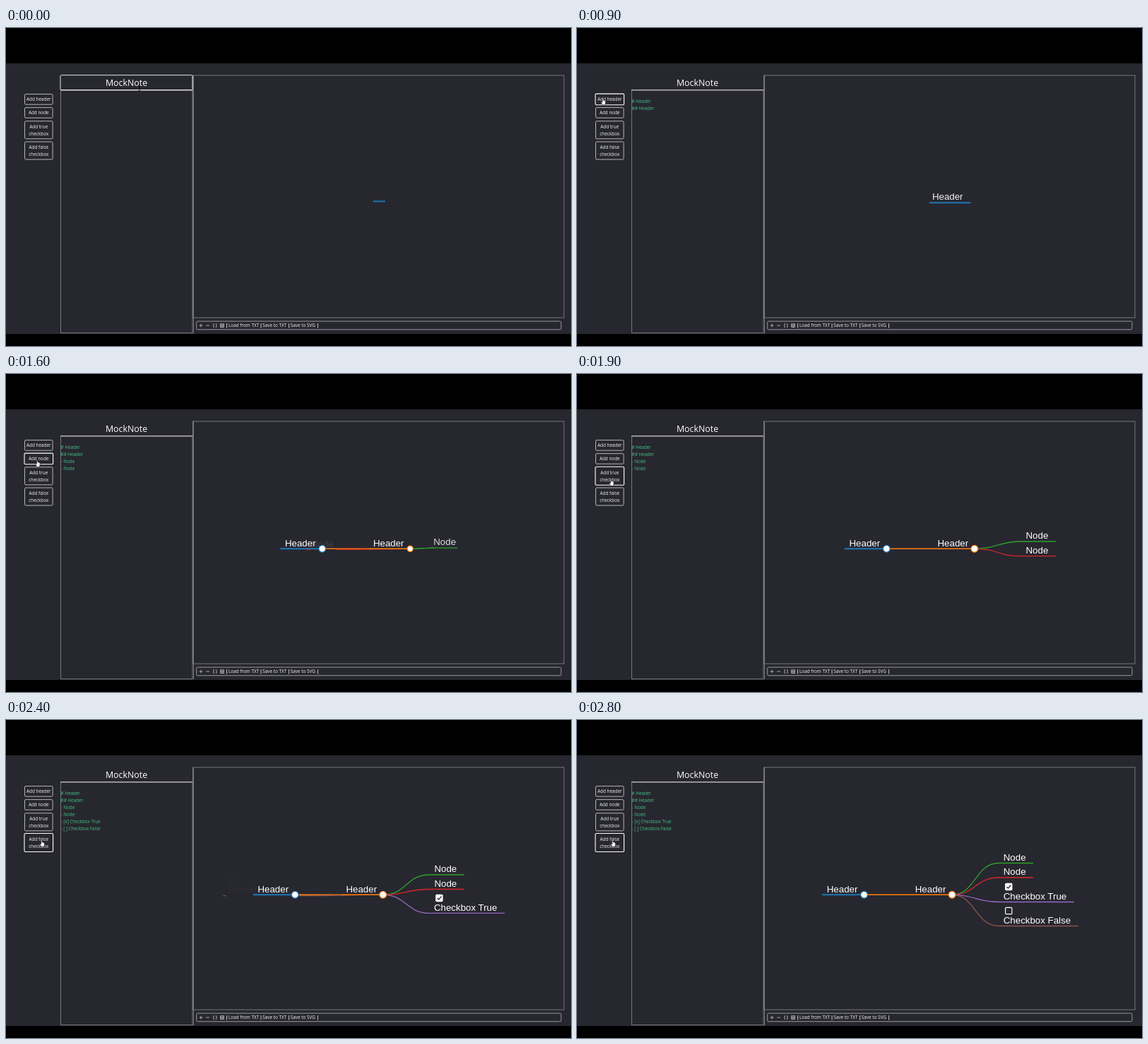
An HTML page for the animation above (2900 ms loop, 800x450 px).

```html
<!DOCTYPE html>
<html lang="en">
<head>
<meta charset="utf-8">
<title>Mind map editor</title>
<style>
  html, body { margin: 0; width: 100%; height: 100%; overflow: hidden; background: #000; }
  svg { display: block; width: 800px; height: 450px; }
  text { font: 6.4px "Open Sans", "Noto Sans", sans-serif; fill: #f2f2f2; white-space: pre; }
  .title { font-size: 12.4px; fill: #fff; }
  .mid { text-anchor: middle; }
  .code { font-size: 6.3px; fill: #46c486; }
  .label text { font: 13.3px "Liberation Sans", Arial, sans-serif; fill: #fff; }
  .frame { fill: none; stroke: #77777c; }
  .button rect { fill: none; stroke: #c4c4c6; stroke-width: .9; }
  .button.hover rect { stroke: #fff; stroke-width: 1.1; }
  .icon { fill: none; stroke: #c8c8ca; stroke-width: .8; }
  .line { fill: none; }
</style>
</head>
<body>
<svg id="stage" viewBox="0 0 800 450">
  <rect y="50" width="800" height="383" fill="#27272f"/>
  <rect class="frame" x="264.5" y="67" width="525.5" height="343"/>
  <path class="frame" d="M265.5 67V432"/>
  <rect class="frame" id="editor" x="77.5" y="88" width="186.5" height="343.5"/>
  <path d="M77 87.8H264" stroke="#d4d4d6"/>
  <rect id="titleBox" x="77" y="66.7" width="187" height="21" rx="1.5" fill="none" stroke="#e6e6e8"/>
  <text class="title mid" x="170.5" y="82.3">MockNote</text>
  <rect x="269.7" y="415" width="516.3" height="11.7" rx="1.5" fill="none" stroke="#a4a4a8" stroke-width=".9"/>
  <g class="icon">
    <path d="M273.6 421h4.8M276 418.6v4.8M283.2 421h4.8"/>
    <path d="M295 418.8h-1.2v4.4h1.2M296.8 418.8h1.2v4.4h-1.2"/>
    <path d="M303.6 418.6h4.8v4.8h-4.8zM303.6 420.4h4.8M305.2 420.4v3M306 422h2.4"/>
    <path d="M312.6 418v6.5M361 418v6.5M400.6 418v6.5M441.6 418v6.5" stroke="#eee"/>
  </g>
  <text x="315" y="423.3">Load from TXT</text>
  <text x="363.3" y="423.3">Save to TXT</text>
  <text x="402.8" y="423.3">Save to SVG</text>
  <g id="buttons"></g>
  <g id="code"></g>
  <g id="links"></g>
  <g id="nodes"></g>
  <path id="beam" d="M-1.2-3.2H1.2M0-3.2V3.2M-1.2 3.2H1.2" fill="none" stroke="#0c0c10" stroke-width=".8"/>
  <path id="hand" d="M-1.6-4.4Q-1-5.2-.4-4.4L-.2-1.6Q.6-2 1-1.3Q1.7-1.6 2-.9Q2.9-1 3-.2V2.2L2.2 4.8H-1.2L-3.4 1.2Q-3.2.2-2.2.9L-1.5 1.4Z"
    fill="#fff" stroke="#111" stroke-width=".5"/>
</svg>
<script>
const LOOP = 2900, TICK = 100, EASE_TIME = 400;
const CENTER = 528.3, ROOT_Y = 247.3, ROOT_RIGHT = 59.5, PAD = 6.7;
const byId = id => document.getElementById(id);
const lerp = (a, b, k) => a + (b - a) * k;
const ease = k => k < .5 ? 4 * k ** 3 : 1 - 4 * (1 - k) ** 3;

function add(parent, tag, attrs = {}, text = "") {
  const el = document.createElementNS("http://www.w3.org/2000/svg", tag);
  set(el, attrs);
  el.textContent = text;
  parent.append(el);
  return el;
}
function set(el, attrs) {
  for (const name in attrs) el.setAttribute(name, attrs[name]);
}

const buttons = [
  [93.6, 14.6, "Add header"], [112.6, 14.6, "Add node"],
  [131.8, 25, "Add true", "checkbox"], [161, 25, "Add false", "checkbox"]
].map(([y, h, ...lines]) => {
  const g = add(byId("buttons"), "g", { class: "button" });
  const box = add(g, "rect", { rx: 1.5 });
  lines.forEach((s, i) => add(g, "text", { class: "mid", x: 46.3, y: y + 9.8 + i * 10 }, s));
  return { g, box, y, h };
});

// x is measured from the left edge of the root
const nodes = [
  { text: "Header", code: "# Header", x: 0, w: 61, color: "#1f77b4", weight: 1.9 },
  { text: "Header", code: "## Header", x: 125, w: 60.5, color: "#ff7f0e", weight: 1.5, from: 59.5 },
  { text: "Node", code: "- Node", x: 250, w: 49, color: "#2ca02c" },
  { text: "Node", code: "- Node", x: 250, w: 49, color: "#d62728" },
  { text: "Checkbox True", code: "- [x] Checkbox True", x: 250, w: 107, color: "#9467bd", box: "on" },
  { text: "Checkbox False", code: "- [ ] Checkbox False", x: 250, w: 112.5, color: "#8c564b", box: "off" }
];
nodes.forEach((n, i) => {
  const stroke = { stroke: n.color, "stroke-width": n.weight || 1.3, class: "line" };
  n.link = add(byId("links"), "path", stroke);
  n.line = add(byId("nodes"), "path", stroke);
  n.label = add(byId("nodes"), "g", { class: "label" });
  add(n.label, "text", { x: PAD, y: -3.8 }, n.text);
  if (n.box) {
    const on = n.box === "on";
    add(n.label, "rect", { x: 9.6, y: -26.1, width: 9.2, height: 9.2, rx: 1, stroke: "#fff", "stroke-width": 1.2, fill: on ? "#fff" : "none" });
    if (on) add(n.label, "path", { d: "M11.3-21.6l2 2.1l4-4.3", fill: "none", stroke: "#27272f", "stroke-width": 1.3 });
  }
  if (i < 2) n.dot = add(byId("nodes"), "circle", { fill: "#fff", stroke: n.color, "stroke-width": 1.3 });
  n.row = add(byId("code"), "text", { class: "code", x: 77.6, y: 105.8 + i * 10 }, n.code);
});

// each step adds the next node: start, map width, leaf heights
const steps = [
  [560, 61, []],
  [860, 185.5, []],
  [1224, 299, [247.3]],
  [1480, 299, [237, 257.7]],
  [1950, 357, [219.5, 240, 274]],
  [2320, 362.5, [202.5, 223, 257.5, 291.5]]
];

function layout(t) {
  const s = { width: 17.5, rootY: 245.3, shown: nodes.map(() => 0), y: nodes.map(() => ROOT_Y) };
  steps.forEach(([start, width, ys], i) => {
    if (t < start) return;
    const end = i + 1 < steps.length ? steps[i + 1][0] : LOOP;
    const k = ease(Math.min(1, (Math.min(t, end) - start) / EASE_TIME));
    s.width = lerp(s.width, width, k);
    s.rootY = lerp(s.rootY, ROOT_Y, k);
    for (let j = 0; j <= i; j++) s.shown[j] = lerp(s.shown[j], 1, k);
    ys.forEach((y, j) => s.y[j + 2] = lerp(s.y[j + 2], y, k));
  });
  s.y[0] = s.rootY;
  return s;
}

function drawMap(t) {
  const s = layout(t), left = CENTER - s.width / 2;
  nodes.forEach((n, i) => {
    const p = s.shown[i], y = s.y[i];
    const enterX = i ? ROOT_RIGHT + 1 - n.w : 17.5 - n.w;
    const x = left + lerp(enterX, n.x, p);
    set(n.label, { transform: `translate(${x} ${y})`, opacity: p });
    if (i) {
      set(n.line, { d: p ? `M${x} ${y}h${n.w * p}` : "" });
      const x0 = left + (i === 1 ? ROOT_RIGHT : lerp(ROOT_RIGHT, 184, s.shown[1]));
      const x1 = left + lerp(ROOT_RIGHT, n.x, p), m = (x0 + x1) / 2;
      set(n.link, { d: p ? `M${x0} ${ROOT_Y}C${m} ${ROOT_Y} ${m} ${y} ${x1} ${y}` : "" });
    } else {
      set(n.line, { d: `M${left} ${y}h${lerp(17.5, n.w, p)}` });
    }
    if (n.dot) {
      const k = s.shown[i + 1];
      set(n.dot, { cx: x + (i ? 59 : ROOT_RIGHT), cy: y, r: 4.9 * k, opacity: k ? 1 : 0 });
    }
    n.row.style.display = t >= steps[i][0] ? "" : "none";
  });
}

// start, end, x, y
const moves = [[50, 450, 37.4, 104], [950, 1200, 45, 126.5], [1800, 1900, 49, 153.5], [2100, 2300, 51.3, 174.5]];

function drawPointer(t) {
  let x = 189, y = 85.5;
  for (const [a, b, tx, ty] of moves) {
    const k = ease(Math.max(0, Math.min(1, (t - a) / (b - a))));
    x = lerp(x, tx, k);
    y = lerp(y, ty, k);
  }
  const overTitle = t < TICK, overEditor = !overTitle && x > 77;
  const place = { transform: `translate(${x} ${y})` };
  set(byId("beam"), place);
  set(byId("hand"), place);
  byId("beam").style.display = x > 77 ? "" : "none";
  byId("hand").style.display = x > 77 ? "none" : "";
  byId("titleBox").style.display = overTitle ? "" : "none";
  byId("editor").style.stroke = overEditor ? "#e0e0e2" : "";
  const tip = y - 5;
  for (const { g, box, y: top, h } of buttons) {
    const on = x < 66 && tip >= top && tip <= top + h, grow = on ? .5 : 0;
    g.classList.toggle("hover", on);
    set(box, { x: 26.5 - grow, y: top - grow, width: 39.6 + 2 * grow, height: h + 2 * grow });
  }
}

const begin = performance.now();
function draw() {
  const now = (performance.now() - begin) % LOOP;
  const t = Math.floor(now / TICK) * TICK;
  drawMap(t);
  drawPointer(t);
  requestAnimationFrame(draw);
}
draw();
</script>
</body>
</html>
```
